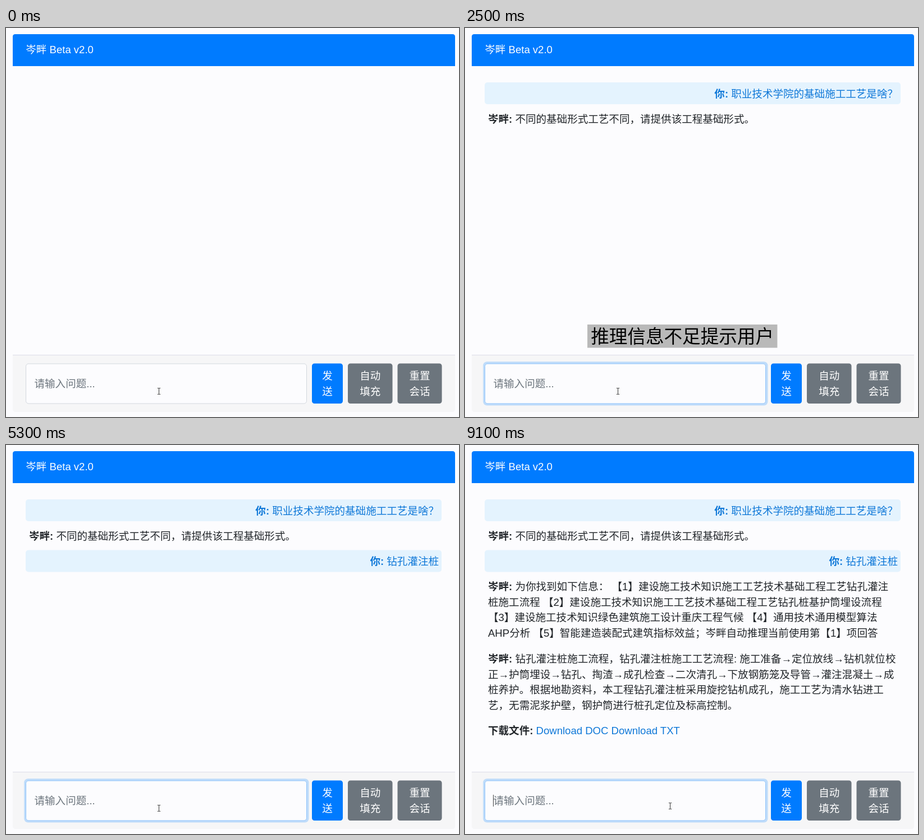
An HTML page for the animation above (9200 ms loop, 807x694 px).

```html
<!DOCTYPE html>
<html lang="zh-CN">
<head>
<meta charset="utf-8">
<style>
html, body { margin: 0; width: 100%; height: 100%; overflow: hidden; background: #fcfcfe; }
svg { display: block; width: 807px; height: 694px; }
text {
  font: 18.56px "Liberation Sans", "Noto Sans CJK SC", "Noto Sans CJK", sans-serif;
  white-space: pre; text-spacing-trim: space-all; fill: #212529;
}
.b { font-weight: bold; }
.blue { fill: #0f78d8; }
.white { fill: #fff; }
.mid { text-anchor: middle; }
.end { text-anchor: end; }
.hint { fill: #6c757d; }
.entry { fill: #495057; }
.cap { font-size: 32.6px; fill: #000; }
.py { font-size: 10.3px; fill: #1f62aa; }
.no { font-size: 8.5px; fill: #7b8794; }
.cand { font-size: 11.75px; fill: #1f62aa; }
.first { fill: #d8431f; }
</style>
</head>
<body>
<svg id="stage" viewBox="0 0 807 694" xmlns="http://www.w3.org/2000/svg"></svg>
<script>
const LOOP = 9200, STEP = 100, EM = 18.56, RATE = 0.125;
const BOT = '岑畔';
const stage = document.getElementById('stage');
const pen = document.createElement('canvas').getContext('2d');

const ANSWER1 = ['不同的基础形式工艺不同，请提供该工程基础形式。'];
const ANSWER2 = [
  '为你找到如下信息： 【1】建设施工技术知识施工工艺技术基础工程工艺钻孔灌注',
  '桩施工流程 【2】建设施工技术知识施工工艺技术基础工程工艺钻孔桩基护筒埋设流程',
  '【3】建设施工技术知识绿色建筑施工设计重庆工程气候 【4】通用技术通用模型算法',
  `AHP分析 【5】智能建造装配式建筑指标效益；${BOT}自动推理当前使用第【1】项回答`
];
const ANSWER3 = [
  '钻孔灌注桩施工流程，钻孔灌注桩施工工艺流程: 施工准备→定位放线→钻机就位校',
  '正→护筒埋设→钻孔、掏渣→成孔检查→二次清孔→下放钢筋笼及导管→灌注混凝土→成',
  '桩养护。根据地勘资料，本工程钻孔灌注桩采用旋挖钻机成孔，施工工艺为清水钻进工',
  '艺，无需泥浆护壁，钢护筒进行桩孔定位及标高控制。'
];
const START3 = 7700 - (ANSWER3.slice(0, 3).join('').length + 7) / RATE;

// Typed phrases: start, end, syllables, committed text
const ENTRIES = [
  { from: 300, send: 1900, tail: '？', tailAt: 1700, phrases: [
    [300, 700, 'zhi ye ji shu xue yuan', '职业技术学院'],
    [700, 800, 'de', '的'],
    [800, 1200, 'ji chu shi gong', '基础施工'],
    [1300, 1500, 'gong yi', '工艺'],
    [1500, 1700, 'shi sha', '是啥']] },
  { from: 3600, send: 5100, tail: '', tailAt: 5100, phrases: [
    [3600, 4300, 'zuan kong', '钻孔'],
    [4400, 4700, 'guan zhu', '灌注'],
    [4700, 4900, 'zhuang', '桩']] }
];
const POOL = {
  z: '在中这怎只再做着自', d: '的到都得地等大多点', j: '就及级即几机集己记',
  g: '个给该搞改跟高更干', s: '是上说时三所使十事'
};
const CANDS = { "zuan'k": ['钻孔', '钻卡', '钻块', '专科*', '钻', '赚', '祖安', '攥', '纂'] };
const CAPTIONS = [
  [2300, 3200, '推理信息不足提示用户', 218],
  [3300, 5000, '用户提供更多信息', 258],
  [6700, 8300, '大模型更新作答', 281]
];

const rect = (x, y, w, h, fill, r = 0, more = '') =>
  `<rect x="${x}" y="${y}" width="${w}" height="${h}" rx="${r}" fill="${fill}" ${more}/>`;
const text = (x, y, s, cls = '') => `<text x="${x}" y="${y}" class="${cls}">${s}</text>`;
const path = (d, color, w = 1) => `<path d="${d}" fill="none" stroke="${color}" stroke-width="${w}"/>`;
const bold = s => `<tspan class="b">${s}</tspan>`;

function width(s, size) {
  pen.font = `${size}px "Liberation Sans", "Noto Sans CJK SC", sans-serif`;
  return pen.measureText(s).width;
}

function button(x, w, fill, a, b) {
  const c = x + w / 2;
  return rect(x, 598.5, w, 71.5, fill, 4.6) +
    text(c, 627, a, 'white mid') + text(c, 654.5, b, 'white mid');
}

function frame() {
  return rect(0, 0, 807, 694, '#fcfcfe') +
    '<path d="M12 68V15.5Q12 11 16.5 11H795.5Q800 11 800 15.5V68Z" fill="#007bff"/>' +
    text(35.3, 45, BOT + ' Beta v2.0', 'white') +
    '<path d="M12 583H800V680Q800 685 795 685H17Q12 685 12 680Z" fill="#f6f6f7"/>' +
    rect(12, 583, 788, 1, '#dcdde8') +
    button(545, 55, '#007bff', '发', '送') +
    button(609, 79.5, '#6c757d', '自动', '填充') +
    button(697.5, 79, '#6c757d', '重置', '会话');
}

function question(y, s) {
  return rect(35, y, 741, 39, '#e4f3fe', 5) +
    text(771, y + 26.5, bold('你:') + ' ' + s, 'blue end');
}

function answer(y, lines, count) {
  if (count <= 0) return '';
  let out = '';
  lines.forEach((line, i) => {
    const part = line.slice(0, Math.max(0, count));
    count -= line.length;
    if (part) out += text(41, y + i * 27.84, (i ? '' : bold(BOT + ':') + ' ') + part);
  });
  return out;
}

function chat(t) {
  const typed = start => Math.round((t - start) * RATE);
  let out = '';
  if (t >= 1900) out += question(97, '职业技术学院的基础施工工艺是啥？');
  out += answer(168.5, ANSWER1, typed(2100));
  if (t >= 5100) out += question(187.5, '钻孔灌注桩');
  out += answer(258.8, ANSWER2, typed(5400));
  out += answer(387.8, ANSWER3, typed(START3));
  if (t >= 8000)
    out += text(41, 516, bold('下载文件:') + ' <tspan class="blue">Download DOC Download TXT</tspan>');
  return out;
}

// Splits the first n letters of a phrase into its syllables
function syllables(spell, n) {
  const parts = [];
  for (const s of spell.split(' ')) {
    if (n <= 0) break;
    parts.push(s.slice(0, n));
    n -= s.length;
  }
  return parts;
}

function candidates(parts, words) {
  const key = parts.join("'");
  if (CANDS[key]) return CANDS[key];
  const pool = [...POOL[key[0]]];
  if (key.length === 1) return pool;
  const head = words.slice(0, parts.length);
  const list = head.length > 2 ? [head, head.slice(0, 2), head[0]] : [head];
  return [...new Set([...list, ...pool])].slice(0, 9);
}

function popup(x, parts, words) {
  const spell = parts.join("'");
  let cx = x + 7.5, row = '';
  candidates(parts, words).forEach((c, i) => {
    const word = c.replace('*', ''), w = word.length * 11.75;
    row += text(cx, 674.5, i + 1, 'no') + text(cx + 7, 675.3, word, i ? 'cand' : 'cand first');
    cx += 17 + w;
    if (word !== c) {
      row += `<circle cx="${cx - 6}" cy="667.5" r="3" fill="none" stroke="#4d86bd" stroke-width=".8"/>` +
        path(`M${cx - 7.5} 667.5l1.2 1.3 2.2-2.6`, '#4d86bd', .8);
      cx += 9;
    }
  });
  const right = cx + 33, end = x + 8 + width(spell, 10.3);
  return rect(x + .5, 645, right - x, 37, '#fdfdff', 1, 'stroke="#a9c9e8"') +
    rect(right - 42, 646, 41, 14, '#f4f4fb') +
    text(x + 7.5, 657, spell, 'py') + rect(end + .5, 648, 1, 10, '#333') + row +
    path(`M${right - 31.5} 668v7`, '#e6e6ee') +
    path(`M${right - 21} 669.5l2.5 2.5-2.5 2.5M${right - 12} 671l2.5 2.5 2.5-2.5`, '#44698f') +
    `<circle cx="${right - 10.5}" cy="653" r="6" fill="#e0683c"/>`;
}

function entry(t) {
  const focus = t >= 200;
  let out = focus ? rect(32.2, 595.2, 507.3, 78.3, '#bfdcfa', 7) : '';
  out += rect(35.5, 599, 500, 71, '#fcfcfe', 4.6, `stroke="${focus ? '#8fc3fb' : '#d3d8de'}"`);
  let s = '', comp = '', box = '';
  const e = ENTRIES.find(e => t >= e.from && t < e.send);
  if (e) {
    for (const [a, b, spell, words] of e.phrases) {
      if (t >= b) s += words;
      else if (t >= a) {
        const letters = spell.replace(/ /g, '');
        const n = 1 + Math.floor((t - a) / (b - a) * letters.length);
        const parts = syllables(spell, n);
        comp = parts.join('');
        box = popup(50.5 + s.length * EM, parts, words);
      }
    }
    if (t >= e.tailAt) s += e.tail;
  }
  const value = s + comp;
  out += value ? text(50.5, 640.5, value, 'entry') : text(50.5, 640.5, '请输入问题...', 'hint');
  if (e || (t >= 2700 && t < 3200) || t >= 8500)
    out += rect(50 + s.length * EM + width(comp, EM), 624, 1, 21, '#444');
  return [out, box];
}

function caption(t) {
  const c = CAPTIONS.find(c => t >= c[0] && t < c[1]);
  if (!c) return '';
  return rect(c[3], 529, c[2].length * 32.6 + 12.4, 41.5, '#b9b9b9') + text(c[3] + 6.2, 562, c[2], 'cap');
}

function pointer(t) {
  const k = Math.min(1, Math.max(0, (t - 8700) / 400));
  const x = 272.5 + 93 * k, y = 648 - 4 * k;
  return path(`M${x - 2.5} ${y - 5.5}h2l.5.5.5-.5h2M${x} ${y - 5}v10M${x - 2.5} ${y + 5.5}h2l.5-.5.5.5h2`, '#333');
}

let last = -1;
function tick(now) {
  const t = Math.floor(now % LOOP / STEP) * STEP;
  if (t !== last) {
    last = t;
    const [field, box] = entry(t);
    stage.innerHTML = frame() + chat(t) + caption(t) + field + box + pointer(t);
  }
  requestAnimationFrame(tick);
}
tick(performance.now());
</script>
</body>
</html>
```
